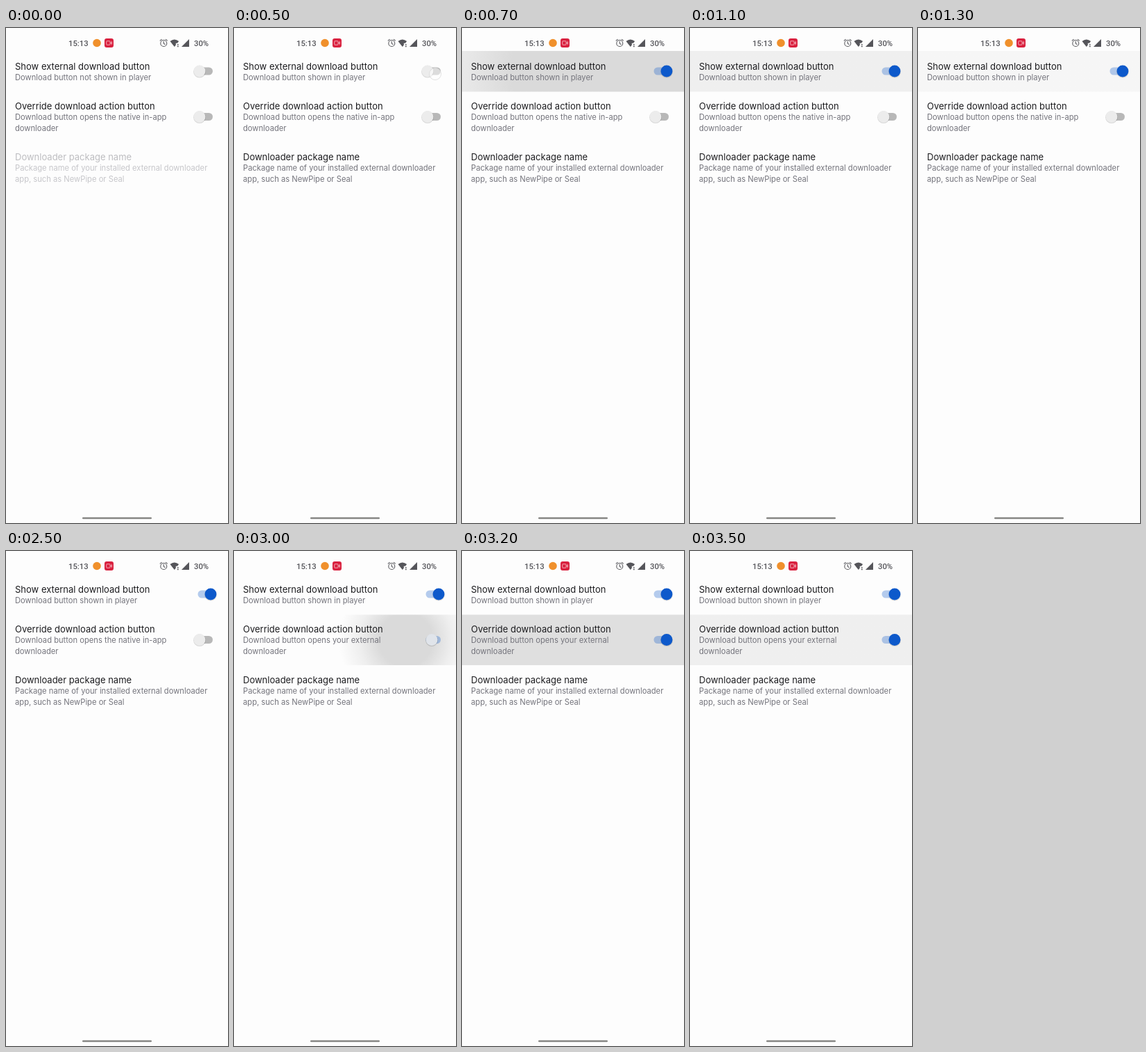
An HTML page that plays this animation: 320 px wide and 711 px high, repeating every 3.6 s.

```html
<!DOCTYPE html>
<html lang="en">
<head>
<meta charset="utf-8">
<style>
html, body { margin: 0; width: 100%; height: 100%; overflow: hidden; background: #fdfdfd; }
svg { display: block; }
text { font: 11.2px Inter, sans-serif; fill: #74747c; }
.title { font-size: 13px; fill: #1c1c1f; }
.status { font: 500 11.3px Roboto, sans-serif; fill: #55555a; }
.off .title { fill: #bdbdc0; }
.off text { fill: #c6c6ca; }
</style>
</head>
<body>
<svg id="stage" width="320" height="711" viewBox="0 0 320 711">
  <defs id="defs"></defs>
  <text class="status" x="90" y="25.5">15:13</text>
  <circle cx="131" cy="21.5" r="5.8" fill="#f0902c"/>
  <rect x="142" y="15" width="13" height="13" rx="3" fill="#d9213f"/>
  <g fill="none" stroke="#f6c4cc" stroke-width=".8">
    <rect x="144.7" y="18.8" width="5.4" height="5.4" rx="1"/>
    <path d="M150.2 21.5l2.3-1.8v3.6z"/>
  </g>
  <g fill="none" stroke="#5c5c60" stroke-width="1.1">
    <circle cx="227.3" cy="22" r="4.5"/>
    <path d="M227.3 19v3.3l2.2 1.4M221.8 18.4l2.8-2.3M232.8 18.4l-2.8-2.3"/>
  </g>
  <g fill="#55555a">
    <path d="M236.5 19q6.3-5 12.6 0l-2.1 2.8h-2.2v2.6l-2 2.6z"/>
    <path d="M247 23h1.6v1.6H247zM247 25.6h1.6v1.6H247z"/>
    <path d="M264 16v11h-11z"/>
  </g>
  <text class="status" x="271" y="25.5">30%</text>

  <g id="rows"></g>

  <text class="title" x="13" y="59.7">Show external download button</text>
  <text id="shown" x="13" y="74.5"></text>
  <text class="title" x="13" y="117.4">Override download action button</text>
  <text id="opens" x="13" y="132.2"></text>
  <text x="13" y="147.8">downloader</text>
  <g id="package">
    <text class="title" x="13" y="190.4">Downloader package name</text>
    <text x="13" y="205.4">Package name of your installed external downloader</text>
    <text x="13" y="220.8">app, such as NewPipe or Seal</text>
  </g>
  <rect x="110" y="702.7" width="100" height="2.6" rx="1.3" fill="#868684"/>
</svg>
<script>
const LOOP = 3600;
const $ = id => document.getElementById(id);
const clamp = v => Math.max(0, Math.min(1, v));
const ramp = (t, from, to) => clamp((t - from) / (to - from));
const smooth = p => p * p * (3 - 2 * p);
const mix = (a, b, p) => `rgb(${a.map((v, i) => Math.round(v + (b[i] - v) * p))})`;

const DARK = [218, 218, 218], PALE = [239, 239, 239];
const THUMB_OFF = [236, 236, 236], THUMB_ON = [13, 89, 203];

function makeRow(id, top, height, cy, press) {
  $('defs').innerHTML += `
    <radialGradient id="g${id}" gradientUnits="userSpaceOnUse" cx="290" cy="${cy}" r="1">
      <stop offset=".4"/>
      <stop offset=".7" stop-color="rgb(${PALE})"/>
      <stop offset="1" stop-color="rgb(${PALE})" stop-opacity="0"/>
    </radialGradient>`;
  $('rows').innerHTML += `
    <rect id="ripple${id}" y="${top}" width="320" height="${height}" fill="url(#g${id})"/>
    <rect id="track${id}" x="276.5" y="${cy - 5.5}" width="21.5" height="11" rx="5.5"/>
    <circle id="shade${id}" cy="${cy + .7}" r="8.9" fill="#000" opacity=".14"/>
    <circle id="thumb${id}" cy="${cy}" r="8.4"/>
    <circle id="touch${id}" cx="290" cy="${cy + 4}" r="8.5" fill="#fff" fill-opacity=".5" stroke="#d8d8d8" stroke-width=".8"/>`;
  return { id, press };
}

function drawRow({ id, press }, t) {
  const s = t - press;
  const p = smooth(ramp(s, 30, 200));
  const x = 279 + 16 * p;
  const set = (name, attrs) => {
    for (const key in attrs) $(name + id).setAttribute(key, attrs[key]);
  };
  // The ripple grows while drifting from the touch point to the row's centre.
  set('g', {
    cx: 290 - 130 * ramp(s, 0, 310),
    r: Math.max(.01, 95 * (Math.max(0, s) / 100) ** 1.8)
  });
  $('g' + id).firstElementChild.setAttribute('stop-color', mix(DARK, PALE, ramp(s, 200, 600)));
  set('ripple', { opacity: s > 0 ? 1 - ramp(s, 600, 1000) : 0 });
  set('track', { fill: s > 60 ? 'rgba(13,89,203,.3)' : 'rgba(0,0,0,.27)' });
  set('shade', { cx: x });
  set('thumb', { cx: x, fill: mix(THUMB_OFF, THUMB_ON, p ** 3) });
  set('touch', { opacity: s >= -100 && s < 60 ? 1 : 0 });
}

const rows = [makeRow('A', 33, 58.5, 62, 500), makeRow('B', 91.5, 72.5, 127.5, 2900)];

function draw(now) {
  const t = now % LOOP;
  rows.forEach(row => drawRow(row, t));
  const enabled = t >= 480;
  $('shown').textContent = `Download button ${enabled ? '' : 'not '}shown in player`;
  $('opens').textContent = `Download button opens ${t >= 2880 ? 'your external' : 'the native in-app'}`;
  $('package').setAttribute('class', enabled ? '' : 'off');
  requestAnimationFrame(draw);
}
requestAnimationFrame(draw);
</script>
</body>
</html>
```
